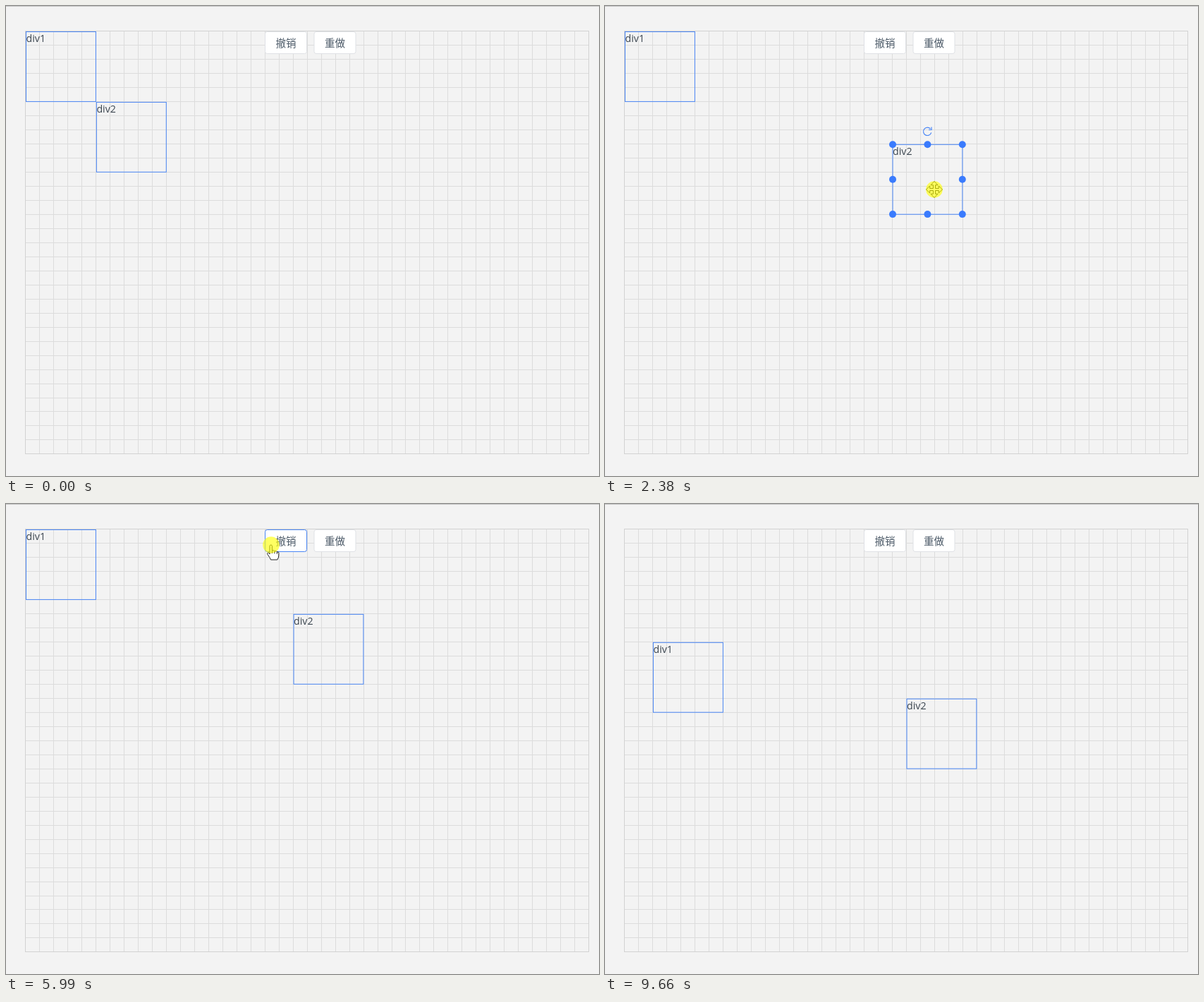
These frames come from a looping animation (841 px wide and 666 px high, 9.92 s). An HTML page:

```html
<!DOCTYPE html>
<html lang="zh">
<head>
<meta charset="utf-8">
<style>
html, body { margin: 0; width: 100%; height: 100%; overflow: hidden; background: #f3f3f3; }
svg { display: block; }
.label { font: 14.2px "Open Sans", "Noto Sans", sans-serif; fill: #3c4650; }
.button text { font: 14.5px "Noto Sans CJK SC", "Noto Sans CJK", sans-serif; fill: #4c5a68; }
.button rect { fill: #fff; stroke: #dfe1e5; }
.button .glow { fill: none; stroke: #4a86f5; }
.blue { fill: none; stroke: #4a86f5; }
.grip { fill: #3a7bfd; }
.icon { fill: none; stroke: #fff; stroke-width: 1.2; }
.pointer { fill: #fff; stroke: #222; stroke-linejoin: round; }
</style>
</head>
<body>
<svg width="841" height="666" viewBox="0 0 841 666">
  <path d="M0 .5H841" stroke="#c6c6c6"/>
  <path id="grid" fill="none" stroke="#dcdcdc"/>
  <rect x="27.5" y="35.5" width="799" height="599" fill="none" stroke="#d2d2d2"/>
  <g id="boxes"></g>
  <g id="buttons"></g>
  <g id="popup">
    <rect width="64.5" height="32" rx="7" fill="#ff5349" fill-opacity=".97"/>
    <path class="icon" d="M8 12.500V10q0-2 2-2h2.500M19.500 8H22q2 0 2 2v2.500M24 19.500V22q0 2-2 2h-2.500M12.500 24H10q-2 0-2-2v-2.500"/>
    <path class="icon" stroke-width="1" d="M12 20l2.300-7.500h.8L17.300 20M13 17.500h3.500M19.500 12.500V20"/>
    <path d="M32.500 9V24" stroke="#fff" stroke-opacity=".7"/>
    <circle class="icon" cx="48.500" cy="15.500" r="6.500"/>
    <path class="icon" d="M53 20l2.500 2.500"/>
  </g>
  <g id="cursor">
    <path class="pointer" data-kind="arrow" d="M.5 .5V17l3.800-3.600 2.600 5.600 2.300-1-2.500-5.500H12z"/>
    <g class="pointer" data-kind="hand">
      <path d="M-2 13V1.700a1.700 1.700 0 0 1 3.400 0V8q3-1 3.500.8q3-.6 3.400 1q2.500-.3 2.500 1.700V15q0 3-2 6H-.5q-1-3-4.500-7.500q-1-2.500.8-2.800q1 0 2.200 2.300z"/>
      <path fill="none" d="M1.400 8v4M4.900 8.800v3.500M8.300 9.800v3"/>
    </g>
    <path class="pointer" data-kind="move" d="M0-11.500L5-6.300H1.500V-1.500H6.300V-5L11.500 0L6.300 5V1.500H1.500V6.300H5L0 11.500L-5 6.300H-1.500V1.500H-6.300V5L-11.500 0L-6.300-5V-1.500H-1.500V-6.300H-5z"/>
    <circle id="press" r="11.800" fill="#ff0" fill-opacity=".62"/>
  </g>
</svg>
<script>
const LOOP = 9920, STEP = 68.6, ENTER = 130, EXIT = 8560, LEAVE = 9660;
const CELL = 19.975, SIZE = 5 * CELL, FADE = 200;
const $ = id => document.getElementById(id);
const show = (el, on) => el.setAttribute('visibility', on ? 'visible' : 'hidden');
const place = (el, x, y) => el.setAttribute('transform', `translate(${x} ${y})`);
const inside = ([x, y], left, top, w, h) => x > left && x < left + w && y > top && y < top + h;

const buttons = {
  undo: { name: '撤销', left: 367.5, spot: [376, 58] },
  redo: { name: '重做', left: 437, spot: [449, 52] }
};
const drag = (box, from, to, grab, drop, leave) => ({ box, from, to, grab, drop, leave, popup: true });
const click = (button, from, to, leave, popup) =>
  ({ button, from, to, leave, popup, grab: buttons[button].spot, drop: buttons[button].spot });

// Each action runs from press to release; the pointer sets off for it at "leave"
const actions = [
  drag(1, 1170, 1680, [198, 199], [478, 219], ENTER),
  drag(1, 2270, 2900, [463, 230], [478, 355], 2140),
  drag(0, 3350, 3650, [82, 83], [127, 236], 2990),
  click('undo', 4870, 4930, 3870),
  click('undo', 5460, 5590),
  click('undo', 5990, 6060),
  click('redo', 6940, 7010, 6370),
  click('redo', 7410, 7480, 0, true),
  click('redo', 7950, 8080)
];
const firstUndo = actions.find(a => a.button);

// Pointer journey built from the actions
const journey = [];
let last = [754, 655];
const travel = (start, end, goal) => {
  journey.push({ start, end, a: last, b: goal });
  last = goal;
};
for (const a of actions) {
  travel(a.leave || a.from - 90, a.from - 20, a.grab);
  travel(a.from, a.to, a.drop);
}
travel(EXIT, 9590, [805, 661]);

function pointerAt(t) {
  const { start, end, a, b } = journey.findLast(leg => leg.start <= t) || journey[0];
  const u = Math.max(0, Math.min(1, (t - start) / (end - start)));
  const e = 1 - (1 - u) ** 3;
  return a.map((v, i) => v + (b[i] - v) * e);
}

// Box cells, replayed through the undo history
function boxesAt(t, tick) {
  const history = [[[0, 0], [5, 5]]];
  let step = 0;
  for (const { box, button, from, to, grab } of actions) {
    if (t < from) break;
    if (button) {
      if (t >= to) step += button === 'undo' ? -1 : 1;
      continue;
    }
    const now = pointerAt(t >= to ? to : Math.max(from, tick));
    const cells = history[step].slice();
    cells[box] = cells[box].map((c, i) => c + Math.round((now[i] - grab[i]) / CELL));
    history[++step] = cells;
  }
  return history[step].map(([cx, cy]) => [28 + cx * CELL, 36 + cy * CELL]);
}

function build() {
  let d = '';
  const line = (origin, i) => Math.floor(origin + .65 + i * CELL) + .5;
  for (let i = 1; i < 40; i++) d += `M${line(27, i)} 35V635`;
  for (let i = 1; i < 30; i++) d += `M27 ${line(35, i)}H827`;
  $('grid').setAttribute('d', d);

  let grips = '';
  for (let i = 0; i < 9; i++)
    if (i !== 4) grips += `<circle class="grip" cx="${.5 + i % 3 * 49.4}" cy="${.5 + Math.floor(i / 3) * 49.4}" r="5"/>`;
  $('boxes').innerHTML = ['div1', 'div2'].map(name => `<g>
    <rect class="blue" x=".5" y=".5" width="98.9" height="98.9"/>
    <text class="label" x=".5" y="15">${name}</text>
    <g>${grips}<path class="blue" stroke-width="1.2" d="M55.200-16.500A5.700 5.700 0 1 1 54-21.800M55.500-24.300V-20.300H51.500"/></g>
  </g>`).join('');

  $('buttons').innerHTML = Object.values(buttons).map(({ name, left }) => `<g class="button" transform="translate(${left} 36.5)">
    <rect width="59" height="31" rx="3"/><rect class="glow" width="59" height="31" rx="3"/>
    <text x="29.500" y="21" text-anchor="middle">${name}</text>
  </g>`).join('');
}

// Share of the recent past that the pointer spent on a button
function glowAt(t, { left }) {
  let hits = 0;
  for (let i = 0; i < 10; i++) hits += inside(pointerAt(t - i * FADE / 10), left, 36.5, 59, 31);
  return hits / 10;
}

function draw(t) {
  const tick = t - (t - ENTER) % STEP;
  const pointer = pointerAt(tick);
  const boxes = boxesAt(t, tick);
  boxes.forEach(([x, y], i) => {
    const el = $('boxes').children[i];
    place(el, x, y);
    const picked = actions.find(a => a.box === i).from;
    show(el.lastElementChild, t >= picked && t < firstUndo.from);
  });

  const glows = Object.values(buttons).map(b => glowAt(t, b));
  document.querySelectorAll('.glow').forEach((el, i) => el.setAttribute('opacity', glows[i]));

  const current = actions.findLast(a => t >= a.from);
  const popup = current && current.popup && t >= current.to + 60 && t < EXIT;
  show($('popup'), popup);
  if (popup) place($('popup'), current.drop[0] - 1, current.drop[1] - 43);

  const live = t >= ENTER && t < LEAVE;
  const kind = Math.max(...glows) > .5 ? 'hand'
    : boxes.some(([x, y]) => inside(pointer, x, y, SIZE, SIZE)) ? 'move' : 'arrow';
  place($('cursor'), ...pointer.map(Math.round));
  document.querySelectorAll('[data-kind]').forEach(el => show(el, live && el.dataset.kind === kind));
  show($('press'), current && t < current.to);
}

build();
const begin = performance.now();
function frame() {
  draw((performance.now() - begin) % LOOP);
  requestAnimationFrame(frame);
}
frame();
</script>
</body>
</html>
```
